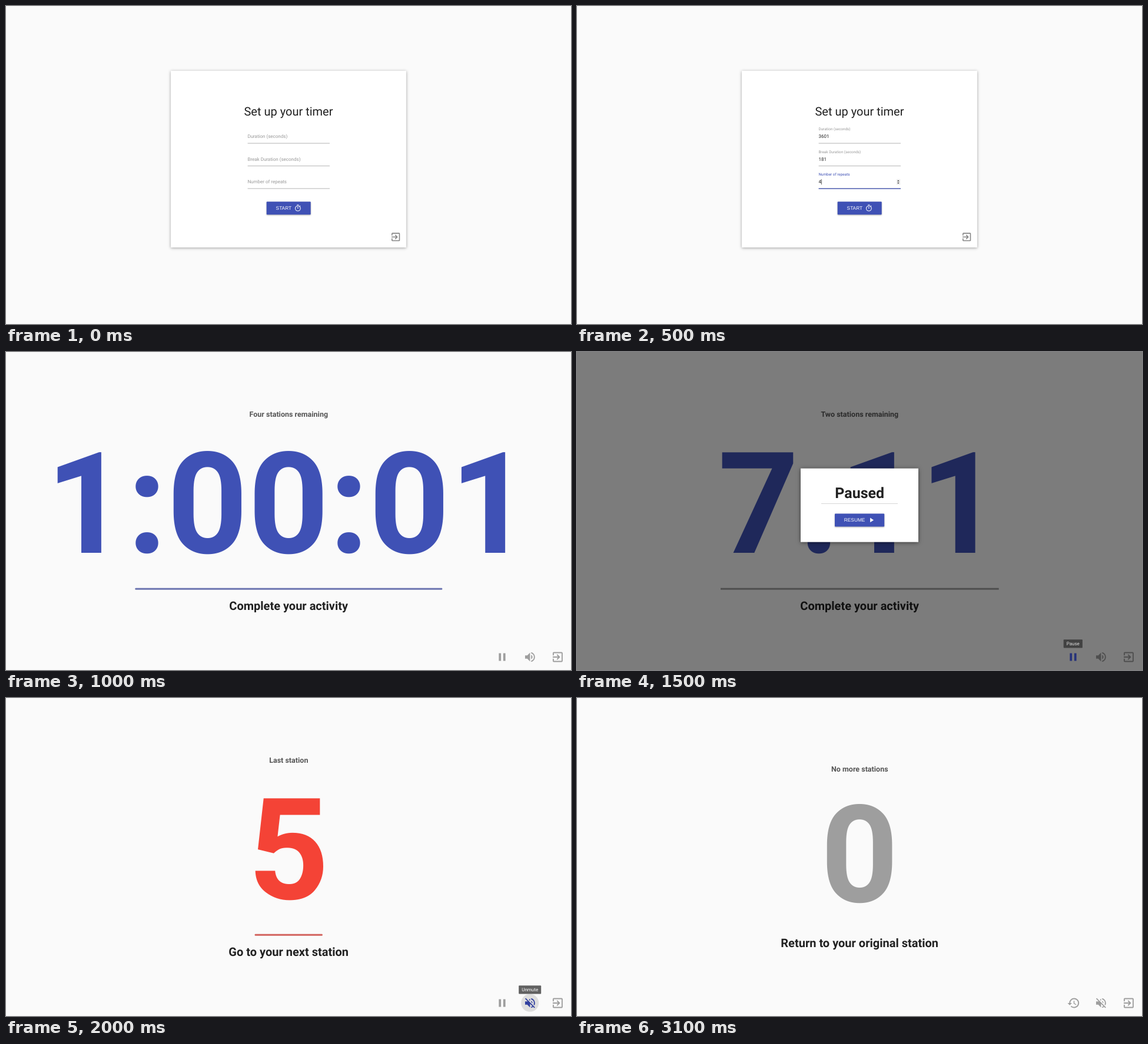
An HTML page for the animation above (3500 ms loop, 960x540 px).

```html
<!DOCTYPE html>
<html lang="en">
<head>
<meta charset="utf-8">
<title>Station timer</title>
<style>
  html, body { margin: 0; width: 100%; height: 100%; overflow: hidden; background: #fafafa; }
  svg { display: block; width: 960px; height: 540px; }
  text { font-family: Roboto, sans-serif; fill: #212121; text-rendering: geometricPrecision; white-space: pre; }

  .scene { visibility: hidden; animation: show 3500ms step-end calc(var(--slot) * 500ms - 3500ms) infinite; }
  .long { animation-name: show-long; }
  @keyframes show { 0% { visibility: visible; } 14.28572% { visibility: hidden; } }
  @keyframes show-long { 0% { visibility: visible; } 28.57143% { visibility: hidden; } }

  .mid { text-anchor: middle; }
  .title { font-size: 20px; }
  .field { font-size: 8px; }
  .hint { fill: #999; }
  .float { font-size: 6.4px; fill: #999; }
  .note { font-size: 12.5px; font-weight: 700; fill: #555; }
  .task { font-size: 20px; font-weight: 700; }
  .clock { font-size: 240px; font-weight: 700; }
  .paused { font-size: 25px; font-weight: 700; }
  .btn { font: 8.333px "Liberation Sans", Arial, sans-serif; fill: #fff; }
  .tip { font-size: 8px; fill: #fff; }

  .blue { fill: #3f51b5; }
  .red { fill: #f44336; }
  .grey { fill: #9e9e9e; }
  .white { fill: #fff; }
  .card { fill: #fff; filter: drop-shadow(.6px 1px 2.6px rgba(0, 0, 0, .36)); }
  .raised { fill: #3f51b5; filter: drop-shadow(0 1px .9px rgba(0, 0, 0, .32)); }
  .modal { fill: #fff; filter: drop-shadow(.6px 1.5px 3.5px rgba(0, 0, 0, .5)); }
</style>
</head>
<body>
<svg viewBox="0 0 960 540">
  <defs>
    <g id="exit"><path transform="translate(-12 -12)" d="M10.09 15.59L11.5 17l5-5-5-5-1.41 1.41L12.67 11H3v2h9.67zM19 3H5a2 2 0 0 0-2 2v4h2V5h14v14H5v-4H3v4a2 2 0 0 0 2 2h14a2 2 0 0 0 2-2V5a2 2 0 0 0-2-2z"/></g>
    <g id="pause"><path transform="translate(-12 -12)" d="M6 5h4v14H6zM14 5h4v14h-4z"/></g>
    <g id="play"><path transform="translate(-12 -12)" d="M8 5v14l11-7z"/></g>
    <g id="sound"><path transform="translate(-12 -12)" d="M3 9v6h4l5 5V4L7 9zM16.5 12A4.5 4.5 0 0 0 14 7.97v8.05A4.5 4.5 0 0 0 16.5 12zM14 3.23v2.06a7 7 0 0 1 0 13.42v2.06a9 9 0 0 0 0-17.54z"/></g>
    <g id="mute"><path transform="translate(-12 -12)" d="M16.5 12A4.5 4.5 0 0 0 14 7.97v2.21l2.45 2.45zM19 12c0 .94-.2 1.82-.54 2.64l1.51 1.51A8.8 8.8 0 0 0 21 12a9 9 0 0 0-7-8.77v2.06A7 7 0 0 1 19 12zM4.27 3L3 4.27 7.73 9H3v6h4l5 5v-6.73l4.25 4.25A6.9 6.9 0 0 1 14 18.7v2.06a9 9 0 0 0 3.69-1.81L19.73 21 21 19.73zM12 4L9.91 6.09 12 8.18z"/></g>
    <g id="restart"><path transform="translate(-12 -12)" d="M13 3a9 9 0 0 0-9 9H1l3.96 4.03L9 12H6a7 7 0 1 1 2.06 4.94l-1.42 1.42A9 9 0 1 0 13 3zM12 8v5l4.28 2.54.72-1.21-3.5-2.08V8z"/></g>
    <g id="timer" fill="none" stroke="#fff" stroke-width="2">
      <circle cy="1" r="8"/>
      <path d="M-3-10h6M0-4v6M5.6-5.4l2.2-2.2"/>
    </g>

    <g id="form">
      <rect class="card" x="280" y="110" width="400" height="300"/>
      <text class="title mid" x="480" y="185.8">Set up your timer</text>
      <path d="M410.6 233.1h139.4M410.6 271.6h139.4M410.6 310h139.4" stroke="#949494" stroke-width=".7"/>
      <rect class="raised" x="442.7" y="332.2" width="75" height="22" rx="1"/>
      <text class="btn" x="458.6" y="346">START</text>
      <use href="#timer" transform="translate(495.9 343.2) scale(.54)"/>
      <use href="#exit" transform="translate(662.2 392.2) scale(.79)" fill="#858585"/>
    </g>
    <g id="leave"><use href="#exit" transform="translate(937.4 518) scale(.9375)"/></g>
    <g id="hold"><use href="#pause" transform="translate(843 518) scale(.9375)"/></g>
    <g id="loud"><use href="#sound" transform="translate(890.4 518) scale(.9375)"/></g>
    <g id="quiet"><use href="#mute" transform="translate(890.4 518) scale(.9375)"/></g>
  </defs>

  <!-- Empty form -->
  <g class="scene" style="--slot: 0">
    <use href="#form"/>
    <g class="field">
      <text class="hint" x="410.4" y="224.4">Duration (seconds)</text>
      <text class="hint" x="410.4" y="262.9">Break Duration (seconds)</text>
      <text class="hint" x="410.4" y="301.4">Number of repeats</text>
    </g>
  </g>

  <!-- Filled form -->
  <g class="scene" style="--slot: 1">
    <use href="#form"/>
    <text class="float" x="410.4" y="211.1">Duration (seconds)</text>
    <text class="float" x="410.4" y="249.5">Break Duration (seconds)</text>
    <text class="float blue" x="410.4" y="288" style="fill: #3f51b5">Number of repeats</text>
    <g class="field">
      <text x="410.4" y="224.4">3601</text>
      <text x="410.4" y="262.9">181</text>
      <text x="410.4" y="301.4">4</text>
    </g>
    <rect x="415.1" y="294.2" width=".7" height="9" fill="#222"/>
    <rect x="542.8" y="293.8" width="6.6" height="9.8" fill="#efefef"/>
    <path d="M544.1 297.7l1.8-2.2 1.8 2.2zM544.1 299.7l1.8 2.2 1.8-2.2z" fill="#444"/>
    <rect class="blue" x="410.6" y="309.5" width="139.4" height="1.25"/>
  </g>

  <!-- Running -->
  <g class="scene" style="--slot: 2">
    <text class="note mid" x="480.3" y="110">Four stations remaining</text>
    <text class="clock mid blue" x="480" y="341" style="fill: #3f51b5">1:00:01</text>
    <rect x="219.3" y="400.7" width="522" height="3" rx="1.2" fill="#6c75b0"/>
    <text class="task mid" x="480.2" y="438">Complete your activity</text>
    <g class="grey">
      <use href="#hold"/><use href="#loud"/><use href="#leave"/>
    </g>
  </g>

  <!-- Paused -->
  <g class="scene" style="--slot: 3">
    <text class="note mid" x="480.3" y="110">Two stations remaining</text>
    <text class="clock mid" x="480" y="341" style="fill: #3f51b5">7:11</text>
    <rect x="244" y="400.7" width="472.7" height="3" fill="#9e9e9e"/>
    <text class="task mid" x="480.2" y="438">Complete your activity</text>
    <g class="grey">
      <use href="#loud"/><use href="#leave"/>
    </g>
    <rect width="960" height="540" fill="#000" opacity=".5"/>
    <use href="#hold" fill="#26327a"/>
    <rect x="826.7" y="488.2" width="32.2" height="14.4" rx="1" fill="#424242"/>
    <text class="tip mid" x="842.8" y="498.3" style="fill: #ddd">Pause</text>
    <rect class="modal" x="380" y="197.7" width="200" height="125"/>
    <text class="paused mid" x="480.2" y="247.7">Paused</text>
    <rect x="415" y="257.2" width="130" height=".8" fill="#ccc"/>
    <rect class="raised" x="438" y="274.4" width="84.2" height="22" rx="1"/>
    <text class="btn" x="453.8" y="288.2">RESUME</text>
    <use class="white" href="#play" transform="translate(500.3 285.4) scale(.54)"/>
  </g>

  <!-- Break, muted -->
  <g class="scene" style="--slot: 4">
    <text class="note mid" x="480.3" y="110">Last station</text>
    <text class="clock mid" x="480" y="341" style="fill: #f44336">5</text>
    <rect x="422.6" y="400.7" width="115.2" height="3" rx="1.2" fill="#d2635e"/>
    <text class="task mid" x="480.2" y="438">Go to your next station</text>
    <circle cx="890.2" cy="517.8" r="15" fill="#dedede"/>
    <use href="#quiet" fill="#303f9f"/>
    <g class="grey">
      <use href="#hold"/><use href="#leave"/>
    </g>
    <rect x="871.2" y="488.2" width="38" height="14.4" rx="1" fill="#616161"/>
    <text class="tip mid" x="890.2" y="498.3">Unmute</text>
  </g>

  <!-- Finished -->
  <g class="scene long" style="--slot: 5">
    <text class="note mid" x="480.3" y="125">No more stations</text>
    <text class="clock mid" x="480" y="346.4" style="font-size: 230.4px; fill: #9e9e9e">0</text>
    <text class="task mid" x="480.2" y="423">Return to your original station</text>
    <g class="grey">
      <use href="#restart" transform="translate(843.8 518) scale(.9375)"/>
      <use href="#quiet"/><use href="#leave"/>
    </g>
  </g>
</svg>
</body>
</html>
```
